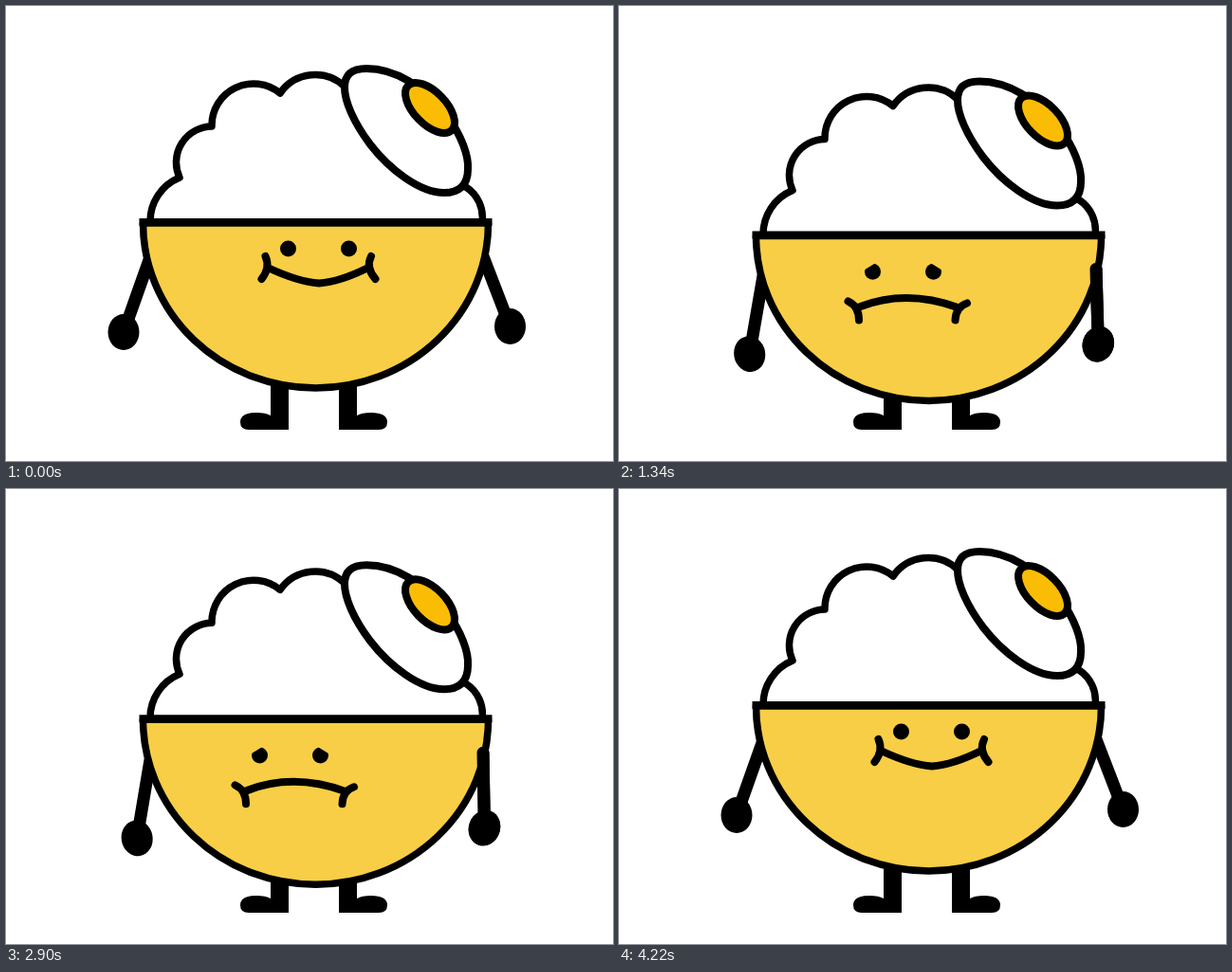
An HTML page for the animation above (4.55 s loop, 640 by 480 pixels).

```html
<!DOCTYPE html>
<html lang="en">
<head>
<meta charset="utf-8">
<title>Rice bowl</title>
<style>
  html, body { margin: 0; width: 100%; height: 100%; overflow: hidden; background: #fff; }
  svg { display: block; width: 100vw; height: 100vh; }
  .line { fill: none; stroke: #000; stroke-width: 8; stroke-linecap: round; stroke-linejoin: round; }
  .white { fill: #fff; }
  .bowl { fill: #f8ce46; stroke-width: 7.5; }
  .yolk { fill: #fbbc05; }
  .arm { stroke-width: 13; }
  .brow { stroke: #f8ce46; stroke-width: 10; stroke-linecap: butt; }
</style>
</head>
<body>
<svg viewBox="0 0 640 480">
  <defs>
    <g id="rightArm">
      <path class="line arm" d="M503 264L531.5 338"/>
      <ellipse cx="531.5" cy="338" rx="16.5" ry="19"/>
    </g>
    <path id="leg" d="M279 390H298V447H256Q247 447 247 439Q247 429 264 429Q274 429 279 432Z"/>
  </defs>

  <use href="#leg"/>
  <use href="#leg" transform="translate(649 0) scale(-1 1)"/>

  <g id="body">
    <g id="left">
      <path class="line arm" d="M152 265L124 344"/>
      <ellipse cx="124" cy="344" rx="16.5" ry="19"/>
    </g>
    <use class="right" href="#rightArm"/>

    <path class="line white" stroke-linejoin="miter" style="stroke-width:7.5"
      d="M152 228A50 50 0 0 1 183 181A38 38 0 0 1 217 127A44 44 0 0 1 289 92A45 45 0 0 1 357 85L485 191A38 38 0 0 1 502 228"/>
    <path class="line white"
      d="M380 66C410 66 440 84 465 116C480 136 488 158 487 172C487 190 477 197 462 197C436 197 404 172 384 146C366 122 357 100 357 86C357 73 364 66 380 66Z"/>
    <ellipse class="line yolk" rx="33" ry="17" transform="translate(447 107.5) rotate(46)"/>
    <path class="line bowl" d="M144.500 229A182 174 0 0 0 508.500 229Z"/>
    <path class="line" style="stroke-linecap:butt" d="M140.500 228H512.500"/>
    <use class="right" id="overArm" href="#rightArm"/>

    <g id="eyes">
      <circle cx="-32" r="8.500"/>
      <circle cx="32" r="8.500"/>
      <path class="line brow" id="browL" d="M-10 0H10"/>
      <path class="line brow" id="browR" d="M-10 0H10"/>
    </g>
    <path class="line" id="mouth"/>
  </g>
</svg>

<script>
  const LOOP = 4550;
  const DROP = 14.3;
  const $ = id => document.getElementById(id);
  const rightArms = document.querySelectorAll('.right');

  // Mouth points: curve (5), left cheek (3), right cheek (3)
  const happy = [[276, 276], [308, 291], [330, 292.5], [352, 291], [382, 276],
                 [273.5, 264], [279, 276], [269.5, 288],
                 [385, 264], [379, 276], [389.5, 288]];
  const sad = [[251, 305], [276, 294.5], [303, 294.5], [330, 294.5], [357, 304.5],
               [241.5, 298], [253, 303], [253, 318],
               [367, 300], [355, 304], [354.5, 318]];

  const mix = (a, b, p) => a + (b - a) * p;

  function ease(t, from, to) {
    const u = Math.min(1, Math.max(0, (t - from) / (to - from)));
    return (1 - Math.cos(Math.PI * u)) / 2;
  }

  // The picture advances in alternating steps of 60 and 30 ms
  function step(t) {
    if (t < 200) return 0;
    const s = t - 200, rest = s % 90;
    return t - rest + (rest >= 60 ? 60 : 0);
  }

  function mouthPath(p) {
    const m = happy.map(([x, y], i) => [mix(x, sad[i][0], p), mix(y, sad[i][1], p)]);
    const curve = (a, b, c) => `M${m[a]}Q${m[b]} ${m[c]}`;
    return `M${m[0]}Q${m[1]} ${m[2]}Q${m[3]} ${m[4]}` + curve(5, 6, 7) + curve(8, 9, 10);
  }

  function draw(time) {
    const t = step(time);
    const fall = ease(t, 200, 1030);
    const sob = t > 1030 && t < 3370 ? (1 - Math.cos(2 * Math.PI * (t - 1030) / 468)) / 2 : 0;
    const body = fall - ease(t, 3653, 4150) - 0.075 * sob;
    const arms = fall - ease(t, 3070, 4220) - 0.04 * sob;
    const face = fall - ease(t, 3290, 4220);

    $('body').setAttribute('transform', `translate(0 ${DROP * body})`);
    $('left').setAttribute('transform', `translate(0 ${6.4 * body}) rotate(${-10 * arms} 152 265)`);
    rightArms.forEach(a => a.setAttribute('transform', `rotate(${20 * arms} 503 264)`));
    $('overArm').setAttribute('opacity', Math.min(1, arms > 0.9 ? 1 : arms * arms));

    $('eyes').setAttribute('transform', `translate(${mix(297.5, 267.5, face) + 32} ${mix(256, 266.7, face)})`);
    const lift = -11.2 - 5 * (1 - face);
    $('browL').setAttribute('transform', `translate(-32 0) rotate(-32) translate(0 ${lift})`);
    $('browR').setAttribute('transform', `translate(32 0) rotate(32) translate(0 ${lift})`);
    $('mouth').setAttribute('d', mouthPath(face));
  }

  const start = performance.now();
  function tick() {
    draw((performance.now() - start) % LOOP);
    requestAnimationFrame(tick);
  }
  tick();
</script>
</body>
</html>
```
